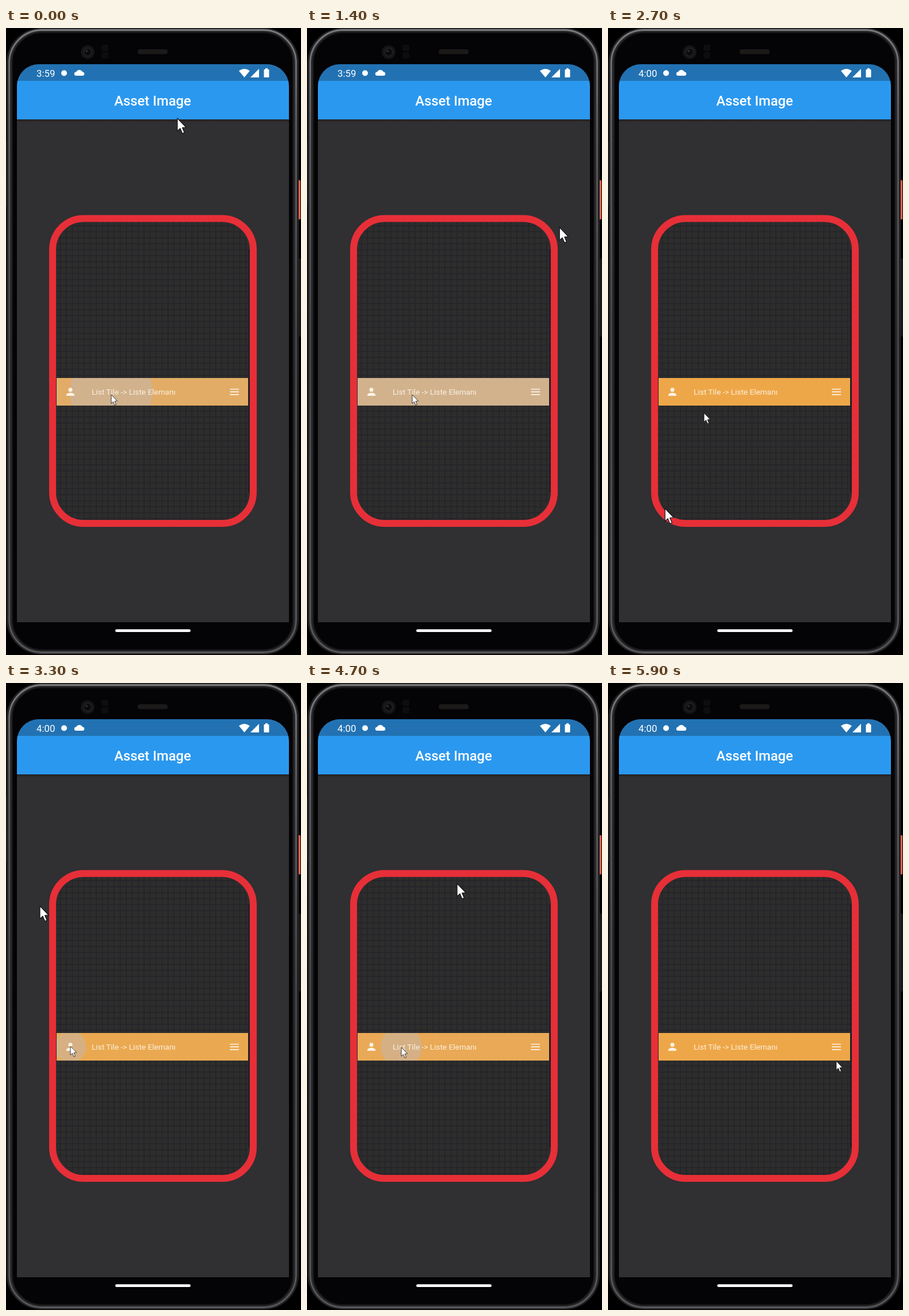
These frames come from a looping animation (513 px wide and 1091 px high, 6000 ms). An HTML page:

```html
<!DOCTYPE html>
<html lang="en">
<head>
<meta charset="utf-8">
<title>List tile demo</title>
<style>
  html, body { margin: 0; width: 100%; height: 100%; overflow: hidden; background: #000; }
  svg { display: block; width: 100%; height: 100%; }
  text { font-family: Roboto, sans-serif; fill: #fff; }
</style>
</head>
<body>
<svg viewBox="0 0 513 1091">
  <defs>
    <linearGradient id="shade" x2="0" y2="1">
      <stop stop-color="#000" stop-opacity=".32"/>
      <stop offset="1" stop-color="#000" stop-opacity="0"/>
    </linearGradient>
    <linearGradient id="rim" x2="0" y2="1">
      <stop stop-color="#7a7a7e"/>
      <stop offset=".15" stop-color="#5c5c60"/>
      <stop offset=".5" stop-color="#464649"/>
      <stop offset="1" stop-color="#58585b"/>
    </linearGradient>
    <pattern id="mesh" width="10.4" height="10.4" patternUnits="userSpaceOnUse">
      <path d="M0 .9H10.4M.9 0V10.4" stroke="#252529" stroke-width="1.8"/>
    </pattern>
    <clipPath id="screen"><path d="M19 1034V101A38 38 0 0 1 57 63H454A38 38 0 0 1 492 101V1034Z"/></clipPath>
    <clipPath id="tile"><rect x="88" y="609" width="333" height="48"/></clipPath>
    <path id="arrow" d="M0 0V20.5L4.6 16.4L8 24.5L11.3 23L8 15.2L14 14.6Z"
      fill="#fff" stroke="#111" stroke-width="1.1" stroke-linejoin="round"/>
  </defs>

  <!-- Phone body -->
  <rect width="513" height="1091"/>
  <rect x="507" y="401" width="6" height="136" rx="2" fill="#18181a"/>
  <rect x="506" y="265" width="6" height="68" rx="1" fill="#f0614e"/>
  <rect x="0" y="199" width="3" height="112" fill="#151517"/>
  <rect x="2" y="1" width="506" height="1088" rx="60" fill="#19191b" stroke="#252528" stroke-width="2"/>
  <rect x="5.5" y="3.5" width="499" height="1083" rx="57" fill="#29292c" stroke="url(#rim)" stroke-width="3"/>
  <rect x="11" y="8" width="488" height="1074" rx="52" fill="#040306" stroke="#151517" stroke-width="2"/>
  <circle cx="142" cy="42" r="12" fill="#141416"/>
  <circle cx="142" cy="42" r="7" fill="#0b0b0e" stroke="#202024" stroke-width="2"/>
  <circle cx="140" cy="40" r="2" fill="#2c2c34"/>
  <rect x="166" y="29" width="12" height="11" rx="3" fill="#0d0d0e"/>
  <rect x="166" y="42" width="12" height="11" rx="3" fill="#0d0d0e"/>
  <rect x="229" y="37" width="52" height="8.5" rx="4" fill="#1c1919"/>

  <!-- App -->
  <g clip-path="url(#screen)">
    <rect x="19" y="63" width="473" height="971" fill="#302f31"/>
    <rect x="19" y="63" width="473" height="30" fill="#2272b3"/>
    <rect x="19" y="92" width="473" height="67" fill="#2b98ef"/>
    <rect x="19" y="159" width="473" height="5" fill="url(#shade)"/>
  </g>
  <text id="clock" x="53" y="84.7" font-size="16.8">3:59</text>
  <circle cx="101" cy="78.5" r="5" fill="#fff"/>
  <g fill="#fff">
    <path d="M122 83a3.2 3.2 0 0 1 0-6.4a6 6 0 0 1 11 0a3.2 3.2 0 0 1 0 6.4Z"/>
    <path d="M405 74.5Q414.5 67.5 424 74.5L414.5 86Z"/>
    <path d="M425 86L440 71V86Z"/>
    <path d="M448.5 73q0-1 1-1H451V70h4v2h1.5q1 0 1 1V85q0 1-1 1h-7q-1 0-1-1Z"/>
    <rect x="190" y="1046.3" width="131" height="4.8" rx="2.4"/>
  </g>
  <text x="255" y="135.3" font-size="23.8" font-weight="500" text-anchor="middle">Asset Image</text>

  <!-- Framed picture -->
  <rect x="81" y="331.5" width="349" height="530.5" rx="54" fill="#2d2d2d"/>
  <rect x="88" y="337" width="333" height="519" rx="48" fill="url(#mesh)"/>
  <path d="M422.5 385V808" stroke="#202126" stroke-width="3"/>
  <rect x="81" y="331.5" width="349" height="530.5" rx="54" fill="none" stroke="#e72f38" stroke-width="12"/>

  <g clip-path="url(#tile)">
    <rect x="88" y="609" width="333" height="48" fill="#eea748"/>
    <g id="ripples" fill="#bcb8bc"></g>
  </g>
  <g fill="#fdf3e6">
    <path transform="translate(101.5 622.5) scale(.875)"
      d="M12 12a4 4 0 1 0 0-8a4 4 0 0 0 0 8zm0 2c-2.67 0-8 1.34-8 4v2h16v-2c0-2.66-5.33-4-8-4z"/>
    <path d="M389.5 628.5h15.5m-15.5 4.7h15.5m-15.5 4.7h15.5" stroke="#fdf3e6" stroke-width="1.7"/>
  </g>
  <text x="149" y="637.5" font-size="13.6" style="fill:#fcf0e0">List Tile -&gt; Liste Elemanı</text>
  <use id="inner" href="#arrow"/>
  <use id="mouse" href="#arrow"/>
</svg>

<script>
const LOOP = 6000, STEP = 100, GLIDE = 300, MOUSE_OUT = 5600;
const CARD = { x: 250, y: 590, w: 187, h: 246 };
const byId = id => document.getElementById(id);
const clamp = v => Math.min(1, Math.max(0, v));
const mix = (a, b, k) => a + (b - a) * k;
const smooth = k => k * k * (3 - 2 * k);

// Points the mouse passes while circling the card
const passes = [
  { t: 0, x: 298, y: 157 }, { t: 700, x: 98, y: 333 }, { t: 2100, x: 433, y: 644 },
  { t: 3300, x: 59, y: 388 }, { t: 4100, x: 278, y: 829 }, { t: 4700, x: 261, y: 349 },
  { t: MOUSE_OUT, x: 80, y: 680 }
];
// Places where the pointer inside the picture rests, with its time of departure
const rests = [
  { x: 183, y: 638, leave: 1500 }, { x: 167, y: 670, leave: 2700 }, { x: 112, y: 632, leave: 3600 },
  { x: 139, y: 661, leave: 4200 }, { x: 164, y: 634, leave: 5100 }, { x: 397, y: 658 }
];
const presses = [
  { start: -400, release: 1550, fade: 900, x: 183 },
  { start: 3180, release: 3450, fade: 500, x: 112 },
  { start: 4525, release: 4900, fade: 500, x: 164 }
];

// Reach is 1 on the card's edge; turn grows clockwise from pass to pass
const edge = turn => Math.max(Math.abs(Math.cos(turn)) / CARD.w, Math.abs(Math.sin(turn)) / CARD.h);
passes.forEach((pass, i) => {
  const dx = pass.x - CARD.x, dy = pass.y - CARD.y;
  pass.turn = Math.atan2(dy, dx);
  pass.reach = Math.hypot(dx, dy) * edge(pass.turn);
  if (i) while (pass.turn < passes[i - 1].turn - 1) pass.turn += 2 * Math.PI;
});

function mouseAt(t) {
  const i = passes.findIndex(pass => pass.t > t);
  const a = passes[i - 1], b = passes[i];
  const k = (t - a.t) / (b.t - a.t);
  const turn = mix(a.turn, b.turn, k);
  const radius = mix(a.reach, b.reach, k) / edge(turn);
  return { x: CARD.x + radius * Math.cos(turn), y: CARD.y + radius * Math.sin(turn) };
}

function innerAt(t) {
  return rests.slice(1).reduce((at, rest, i) => {
    const k = smooth(clamp((t - rests[i].leave) / GLIDE));
    return { x: mix(at.x, rest.x, k), y: mix(at.y, rest.y, k) };
  }, rests[0]);
}

function addShape(name, attributes) {
  const node = document.createElementNS("http://www.w3.org/2000/svg", name);
  for (const key in attributes) node.setAttribute(key, attributes[key]);
  return byId("ripples").appendChild(node);
}

for (const press of presses) {
  press.glow = addShape("rect", { x: 88, y: 609, width: 333, height: 48 });
  press.circle = addShape("circle", { cx: press.x, cy: 633 });
}

function drawPress({ glow, circle, start, release, fade }, t) {
  const held = Math.max(0, t - start), after = Math.max(0, t - release);
  const strength = held ? clamp(1 - after / fade) : 0;
  glow.setAttribute("opacity", .26 * clamp(held / 400) * strength);
  circle.setAttribute("opacity", .45 * strength);
  circle.setAttribute("r", 8 + .16 * held + .6 * after);
}

function place(id, { x, y }, scale) {
  byId(id).setAttribute("transform", `translate(${x} ${y}) scale(${scale})`);
}

function draw(now) {
  const t = Math.floor((now % LOOP) / STEP) * STEP;
  const mouseShown = t < MOUSE_OUT;
  byId("mouse").setAttribute("visibility", mouseShown ? "visible" : "hidden");
  if (mouseShown) place("mouse", mouseAt(t), 1.08);
  place("inner", innerAt(t), .75);
  presses.forEach(press => drawPress(press, t));
  byId("clock").textContent = t < 2700 ? "3:59" : "4:00";
}

function tick() {
  draw(performance.now());
  requestAnimationFrame(tick);
}
tick();
</script>
</body>
</html>
```
